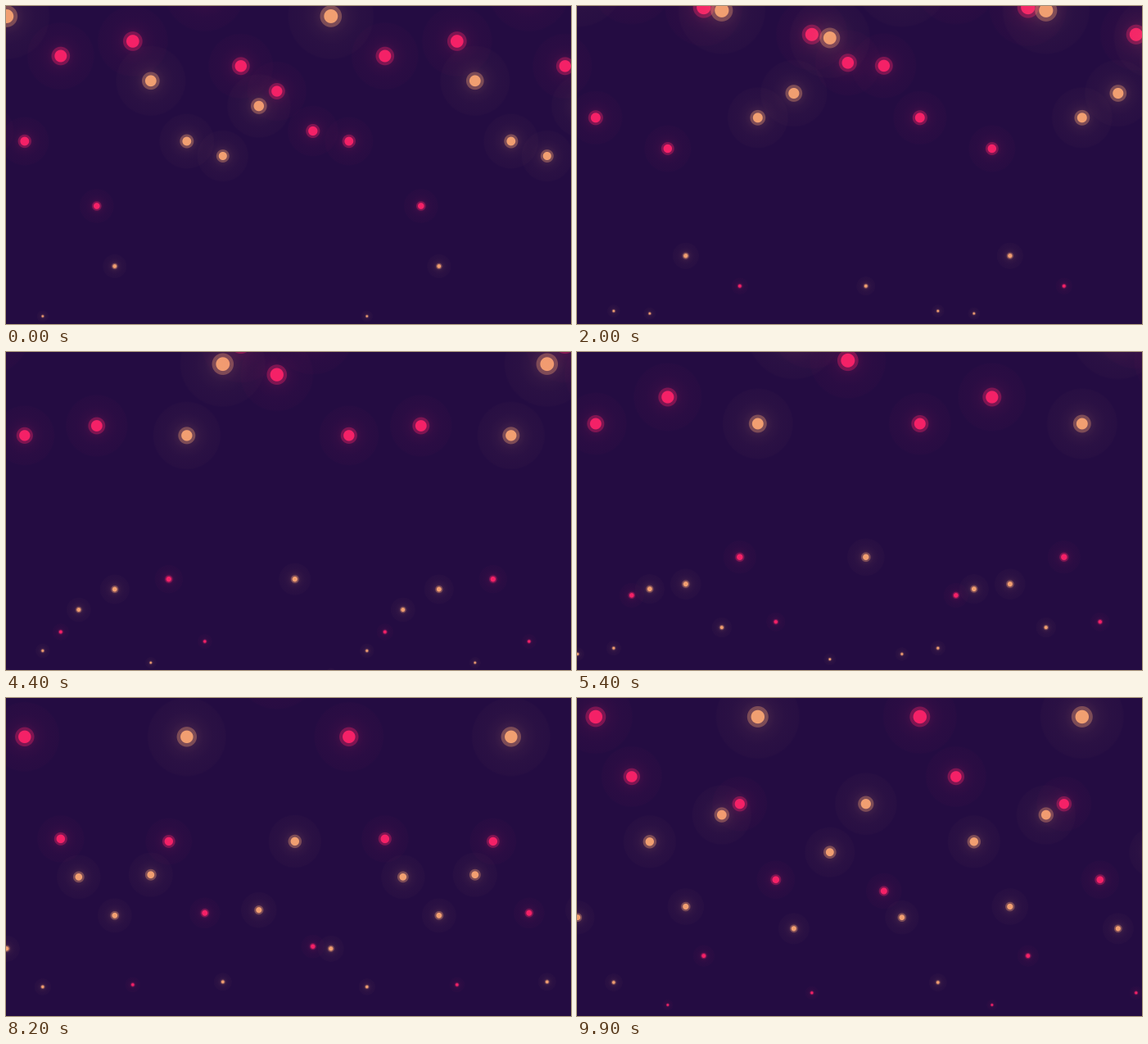
Animation of 690 by 388 pixels, one loop 10 s. Source, as an HTML page without scripts:

```html
<!DOCTYPE html>
<html lang="en">
<head>
<meta charset="utf-8">
<title>Rising lights</title>
<style>
@property --t {
  syntax: "<number>";
  inherits: true;
  initial-value: 0;
}
html, body {
  margin: 0;
  width: 100%;
  height: 100%;
  overflow: hidden;
  background: #240c42;
}
.sky {
  position: relative;
  width: 690px;
  height: 388px;
  overflow: hidden;
  animation: clock 10s steps(100) infinite;
}
@keyframes clock {
  from { --t: 0; }
  to { --t: 10; }
}

/* --i column, --y height at the start, --v speed in px per second */
.sky i {
  --c: 241 159 113;
  --ring: 15px;
  --halo: 60px;
  --twin: 396px;
  --raw: calc(var(--y) - var(--v) * var(--t));
  /* past the top edge (-42) a light starts again 477px lower */
  --now: calc(var(--raw) + 477 * clamp(0, (-42 - var(--raw)) * 10000, 1));
  --s: calc((435 - var(--now)) / 477);
  position: absolute;
  left: 0;
  top: 0;
  transform: translate(calc(.8px + 22px * var(--i)), calc(1px * var(--now)));
}
.sky .p {
  --c: 244 33 103;
  --ring: 14.4px;
  --halo: 53px;
}
.sky .left { --twin: -396px; }

.sky i::before, .sky i::after {
  --core: calc(9.5px * var(--s));
  --rim: calc(var(--ring) * var(--s));
  --far: calc(var(--halo) * var(--s));
  content: "";
  position: absolute;
  left: -64px;
  top: -64px;
  width: 128px;
  height: 128px;
  background: radial-gradient(circle at center,
    rgb(var(--c)) calc(var(--core) - .5px),
    rgb(var(--c) / .43) calc(var(--core) + .5px),
    rgb(var(--c) / .43) calc(var(--rim) - .5px),
    rgb(var(--c) / .11) calc(var(--rim) + .5px),
    rgb(var(--c) / .06) calc(var(--far) * .42),
    rgb(var(--c) / .03) calc(var(--far) * .65),
    rgb(var(--c) / .018) calc(var(--far) * .96),
    rgb(var(--c) / 0) var(--far));
}
.sky i::after { margin-left: var(--twin); }
</style>
</head>
<body>
<div class="sky">
  <i style="--i:0;--y:12.5;--v:22.4"></i>
  <i class="p" style="--i:1;--y:165;--v:14.35"></i>
  <i style="--i:2;--y:378.5;--v:3.18"></i>
  <i class="p" style="--i:3;--y:61;--v:44.65"></i>
  <i style="--i:4;--y:425.8;--v:25.3"></i>
  <i class="p" style="--i:5;--y:244;--v:35"></i>
  <i style="--i:6;--y:317.5;--v:6.36"></i>
  <i class="p" style="--i:7;--y:43;--v:20.75"></i>
  <i style="--i:8;--y:91.3;--v:43"></i>
  <i class="p" style="--i:9;--y:395.5;--v:26.9"></i>
  <i style="--i:10;--y:165;--v:14.35"></i>
  <i class="p" style="--i:11;--y:-18.7;--v:23.9"></i>
  <i style="--i:12;--y:183;--v:38.25"></i>
  <i class="p" style="--i:13;--y:73.3;--v:19.25"></i>
  <i style="--i:14;--y:122;--v:41.5"></i>
  <i class="p" style="--i:15;--y:104;--v:17.35"></i>
  <i class="left" style="--i:16;--y:395.5;--v:26.9"></i>
  <i class="p left" style="--i:17;--y:152.5;--v:39.8"></i>
</div>
</body>
</html>
```
